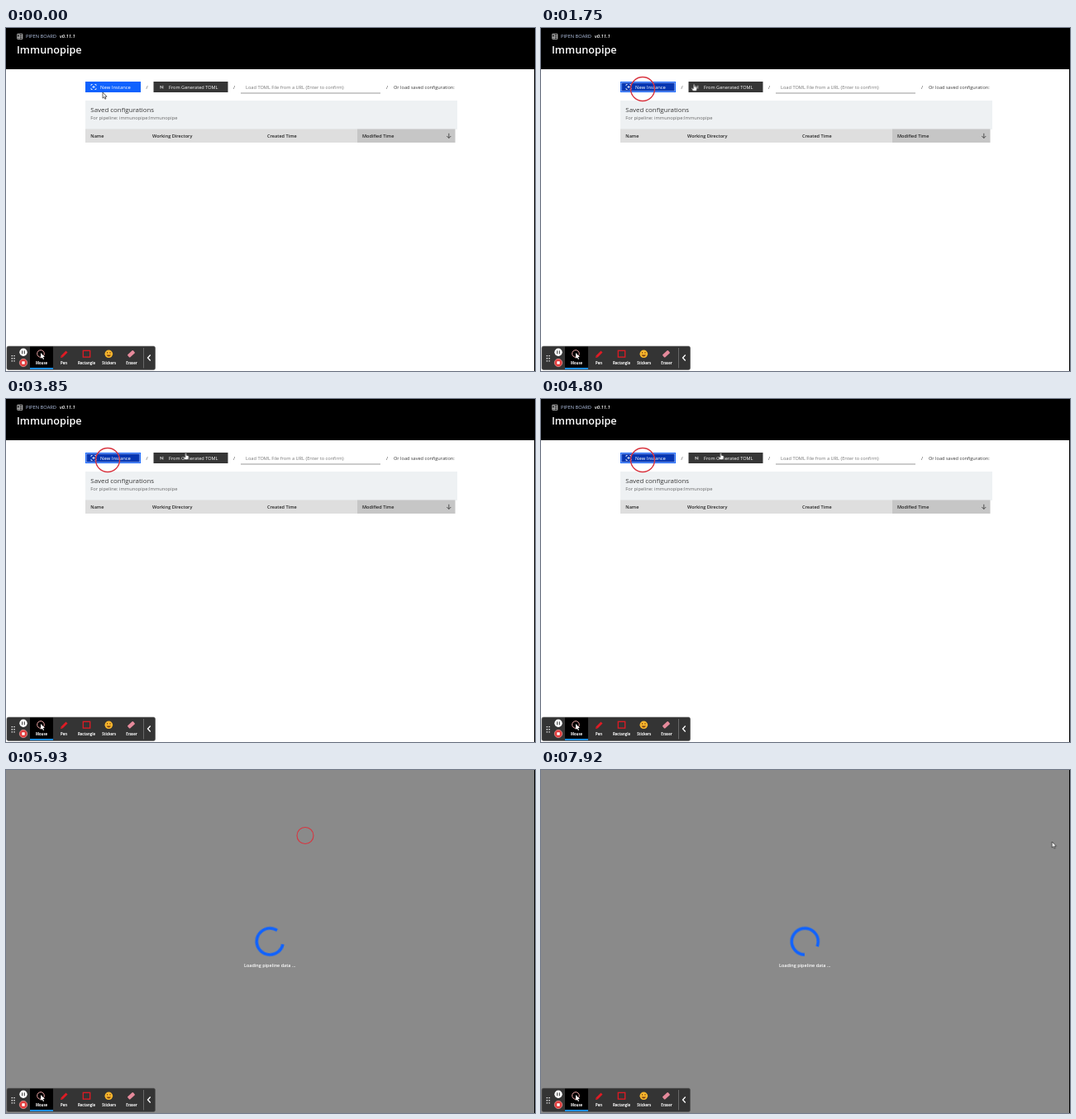
These frames come from a looping animation (640x416 px, 8 s). An HTML page:

```html
<!DOCTYPE html>
<html lang="en">
<head>
<meta charset="utf-8">
<title>Pipeline board</title>
<style>
html, body { margin: 0; width: 100%; height: 100%; overflow: hidden; background: #fff; }
svg { display: block; width: 100vw; height: 100vh; }
text { font-family: "Open Sans", "Noto Sans", sans-serif; font-size: 5.65px; fill: #393939; }
.white { fill: #fff; }
.muted { fill: #777; }
.heads text { font-size: 5.55px; font-weight: 600; fill: #222; }
.tools text { font-size: 4.3px; font-weight: 700; fill: #fff; text-anchor: middle; }
.line { fill: none; stroke: #fff; }
.ring { fill: none; stroke: #d9343f; stroke-width: 1.4; }

/* Everything shares one 8 s timeline. */
.anim { animation: 8s linear infinite; }
.pressed { animation-name: pressed; animation-timing-function: step-end; }
.first { animation-name: first-click; }
.arrow { animation-name: arrow; }
.hand { animation-name: hand; }
.overlay { animation-name: overlay; animation-timing-function: step-end; }
.second { animation-name: second-click; }
.pointer { animation-name: pointer; }
.spinner { animation-name: spin; transform-origin: 319.3px 208px; }

@keyframes pressed { 0% { opacity: 0; } 8.7% { opacity: 1; } }
@keyframes first-click {
  0%, 8.69% { opacity: 0; r: 10px; }
  8.7% { opacity: 1; r: 10px; }
  10.8%, 100% { opacity: 1; r: 14.5px; }
}
@keyframes arrow {
  0%, 5.5% { opacity: 1; transform: translate(117px, 78px); }
  7.6% { opacity: 1; transform: translate(122px, 74px); }
  7.61%, 100% { opacity: 0; transform: translate(122px, 74px); }
}
@keyframes hand {
  0%, 7.6% { opacity: 0; transform: translate(123px, 73px); }
  7.61%, 19.75% { opacity: 1; transform: translate(123px, 73px); }
  23%, 62.24% { opacity: 1; transform: translate(217.5px, 65px); }
  62.25%, 100% { opacity: 0; transform: translate(217.5px, 65px); }
}
@keyframes overlay { 0% { visibility: hidden; } 74.1% { visibility: visible; } 100% { visibility: visible; } }
@keyframes second-click {
  0%, 75.2% { opacity: 1; r: 10px; }
  80%, 100% { opacity: 0; r: 14.5px; }
}
@keyframes pointer {
  0%, 76.25% { opacity: 0; transform: translate(362px, 79px); }
  76.26% { opacity: 1; transform: translate(362px, 79px); }
  84.5%, 100% { opacity: 1; transform: translate(618.3px, 87px); }
}
@keyframes spin {
  0% { transform: rotate(0); }
  74.1% { transform: rotate(0); animation-timing-function: steps(24); }
  100% { transform: rotate(1209.6deg); }
}
</style>
</head>
<body>
<svg viewBox="0 0 640 416" preserveAspectRatio="none">
  <defs>
    <path id="arrow-shape" d="M0 0V7.2L1.7 5.7L2.8 8.2L4 7.7L2.9 5.2H5Z" fill="#fff" stroke="#222" stroke-width=".7"/>
    <path id="hand-shape" d="M-.9 .6Q0-.5 .9 .6V3.2L3 3.7Q4 4 3.8 5.2L3 8.7H-1.2L-3.4 5.6Q-3.2 4.5-2.2 5L-.9 6Z"
      fill="#fff" stroke="#222" stroke-width=".7"/>
    <g id="scan-icon" fill="none" stroke="#fff" stroke-width=".8">
      <path d="M0 1.6V0H1.6M4.4 0H6V1.6M6 4.4V6H4.4M1.6 6H0V4.4"/>
      <path d="M3 1.4V4.6M1.4 3H4.6"/>
    </g>
  </defs>

  <rect width="640" height="416" fill="#fff"/>
  <rect width="640" height="50" fill="#000"/>
  <path d="M13.8 7.3H19.8V13.3H13.8ZM16 7.3V13.3M16 9.5H19.8M13.8 11.3H19.8" class="line" stroke-width=".7"/>
  <text x="24" y="12.4" style="font-size:5.75px;fill:#b4c4e4">PIPEN BOARD</text>
  <text x="65" y="12.4" style="font-size:5.8px;font-weight:600;font-style:italic;fill:#fff">v0.11.1</text>
  <text x="13" y="31.2" style="font-size:12.7px;font-weight:600;fill:#fff">Immunopipe</text>

  <rect x="96" y="65" width="67" height="13" fill="#0f62fe"/>
  <g class="anim pressed">
    <rect x="96" y="65" width="67" height="13" fill="#0f62fe"/>
    <rect x="97.2" y="66.2" width="64.6" height="10.6" fill="#0636b2" stroke="#b9cdfb" stroke-width=".6"/>
  </g>
  <use href="#scan-icon" x="103" y="68.5"/>
  <text x="114" y="73.7" class="white" style="font-size:5.9px">New Instance</text>
  <rect x="178.500" y="65" width="90" height="13" fill="#363636"/>
  <path d="M187 70V73.500M187 70.300L189.800 73.300V69.800" class="line" stroke-width=".7"/>
  <text x="197" y="73.7" class="white" style="font-size:5.6px">From Generated TOML</text>
  <text x="169.500" y="73.7">/</text>
  <text x="275" y="73.7">/</text>
  <text x="460" y="73.7">/</text>
  <text x="290" y="73.7" class="muted">Load TOML File from a URL (Enter to confirm)</text>
  <rect x="284" y="78.500" width="169" height="1" fill="#999"/>
  <text x="469" y="73.7" style="font-size:5.6px">Or load saved configuration:</text>

  <rect x="96" y="88" width="450" height="35" fill="#eef1f3"/>
  <text x="102.300" y="102.300" style="font-size:7.9px">Saved configurations</text>
  <text x="102.300" y="110.800" style="font-size:5.75px;fill:#666">For pipeline: immunopipe:Immunopipe</text>
  <rect x="96" y="122.500" width="329" height="16.500" fill="#dedede"/>
  <rect x="425" y="122.500" width="118.500" height="16.500" fill="#c6c6c6"/>
  <g class="heads">
    <text x="102.300" y="133">Name</text>
    <text x="177" y="133">Working Directory</text>
    <text x="316" y="133">Created Time</text>
    <text x="431" y="133">Modified Time</text>
  </g>
  <path d="M535.800 127.800V133.500M533.300 131L535.800 133.500L538.300 131" fill="none" stroke="#333" stroke-width=".8"/>

  <circle class="ring anim first" cx="123" cy="74" r="14.5"/>
  <use class="anim arrow" href="#arrow-shape"/>
  <use class="anim hand" href="#hand-shape"/>

  <g class="anim overlay">
    <rect width="640" height="416" fill="#8a8a8a"/>
    <circle class="ring anim second" cx="362" cy="79.500" r="10" style="stroke-width:1.1"/>
    <g class="anim spinner">
      <circle cx="319.300" cy="208" r="16" fill="none" stroke="#0f62fe" stroke-width="3.700"
        pathLength="360" stroke-dasharray="291 69" transform="rotate(12 319.3 208)"/>
    </g>
    <text x="288" y="239.200" class="white" style="font-size:5.45px;font-weight:600">Loading pipeline data ...</text>
    <use class="anim pointer" href="#arrow-shape"/>
  </g>
  <rect x="639" width="1" height="416" fill="#000"/>

  <g class="tools">
    <rect x="1" y="386" width="179.500" height="28.500" rx="2" fill="#343434" stroke="#555" stroke-width=".6"/>
    <rect x="29" y="386.500" width="28" height="27.500" fill="#000"/>
    <rect x="29" y="412" width="28" height="2" fill="#1a8ce8"/>
    <path d="M7.300 397V405M10 397V405" class="line" stroke-width="1.300" stroke-dasharray="1.300 1.800"/>
    <circle cx="21" cy="393.300" r="4.700" class="white"/>
    <path d="M19.700 391.300V395.300M22.300 391.300V395.300" stroke="#333" stroke-width="1"/>
    <circle cx="21" cy="406" r="4.700" fill="#e23b3b" stroke="#f3b4b4" stroke-width=".6"/>
    <rect x="19.300" y="404.300" width="3.400" height="3.400" class="white"/>

    <circle cx="42" cy="395" r="4.300" fill="none" stroke="#e8a0a0" stroke-width="1"/>
    <path d="M42 394V401L43.600 399.500L45 402L46 401.400L44.800 399H47Z" class="white"/>
    <path d="M67.500 398.500L73.500 392.500" stroke="#e01b24" stroke-width="2.800"/>
    <path d="M66 400L66.600 397.600L68.400 399.400Z" fill="#e01b24"/>
    <rect x="93.300" y="391.300" width="8.400" height="7.800" fill="none" stroke="#e01b24" stroke-width="1.300"/>
    <circle cx="124.300" cy="395.300" r="4.800" fill="#f6b62c"/>
    <path d="M121.500 396.500Q124.300 400.500 127.100 396.500Z" fill="#7a3b10"/>
    <path d="M122.600 393V394.500M126 393V394.500" stroke="#7a3b10" stroke-width="1"/>
    <rect x="147" y="393" width="9" height="4.500" rx="1" fill="#e58a9b" transform="rotate(-42 151.500 395.300)"/>

    <text x="43" y="407.500">Mouse</text>
    <text x="70" y="407.500">Pen</text>
    <text x="97.500" y="407.500">Rectangle</text>
    <text x="124.700" y="407.500">Stickers</text>
    <text x="152" y="407.500">Eraser</text>
    <path d="M166.500 388V412.500" stroke="#777" stroke-width=".8"/>
    <path d="M174.700 396.500L171.500 400L174.700 403.500" class="line" stroke-width="1.300"/>
  </g>
</svg>
</body>
</html>
```
